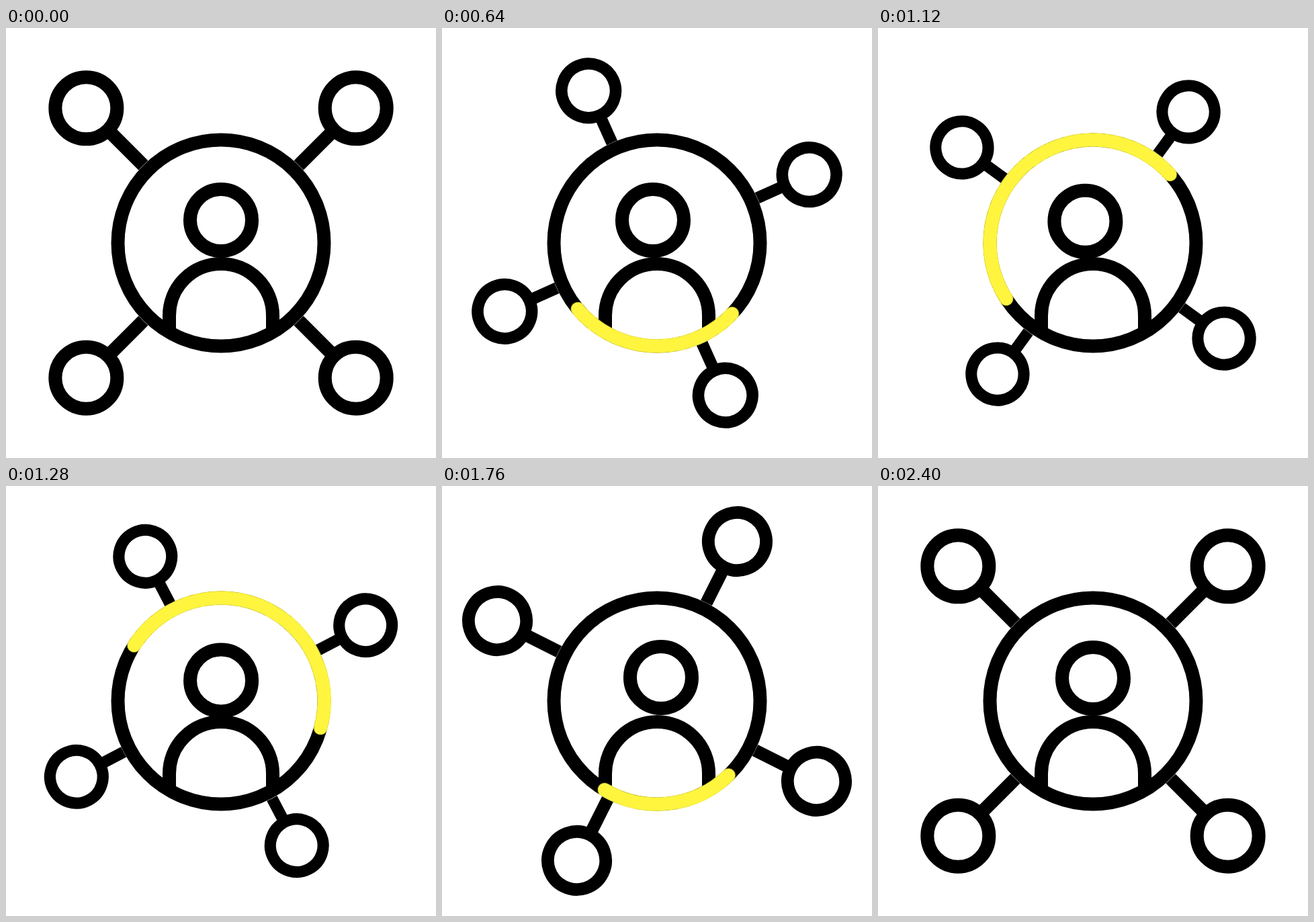
Recreate the animation shown at these times as an HTML page. Size 640 px wide and 640 px high, loop 2.48 s.

```html
<!DOCTYPE html>
<html lang="en">
<head>
<meta charset="utf-8">
<title>Network hub</title>
<style>
  html, body { margin: 0; width: 100%; height: 100%; overflow: hidden; background: #fff; }
  svg { display: block; width: 100%; height: 100%; }
  svg * { transform-origin: 0 0; }

  .line { fill: none; stroke: #000; stroke-width: 20; }
  .arc { fill: none; stroke: #fff53f; stroke-width: 20.6; stroke-linecap: round; }

  .nodes, .arc, .look, .nod { animation: 2480ms linear infinite; }
  .nodes { animation-name: spin, shrink; }
  .arc { animation-name: travel, stretch, show; }
  .look { animation-name: look; }
  .nod { animation-name: nod; }

  @keyframes spin {
    0% { rotate: 0deg; animation-timing-function: cubic-bezier(.535, 0, .437, 1); }
    96.774%, 100% { rotate: 180deg; }
  }
  @keyframes shrink {
    0% { scale: 1; animation-timing-function: cubic-bezier(.54, 0, .43, 1); }
    38.71% { scale: .85; }
    42.742% { scale: .85; animation-timing-function: cubic-bezier(.53, 0, .437, 1); }
    96.774%, 100% { scale: 1; }
  }

  /* tail angle of the highlight */
  @keyframes travel {
    0% { rotate: 20deg; animation-timing-function: cubic-bezier(.333, 0, .667, .376); }
    12.903% { rotate: 21.5deg; animation-timing-function: cubic-bezier(.333, .043, .667, .531); }
    25.806% { rotate: 43.2deg; animation-timing-function: cubic-bezier(.333, .199, .667, .535); }
    38.71% { rotate: 94.5deg; animation-timing-function: cubic-bezier(.333, .202, .667, .651); }
    51.613% { rotate: 212.2deg; animation-timing-function: cubic-bezier(.333, .318, .667, .761); }
    70.968% { rotate: 405.8deg; animation-timing-function: cubic-bezier(.333, .428, .667, 1); }
    96.774%, 100% { rotate: 550deg; }
  }
  /* length of the highlight in degrees */
  @keyframes stretch {
    0% { stroke-dasharray: 0 400; animation-timing-function: cubic-bezier(.333, 0, .667, .454); }
    12.903% { stroke-dasharray: 17.6 400; animation-timing-function: cubic-bezier(.333, .12, .667, .695); }
    25.806% { stroke-dasharray: 96.7 400; animation-timing-function: cubic-bezier(.333, .362, .667, .84); }
    38.71% { stroke-dasharray: 163.8 400; animation-timing-function: cubic-bezier(.333, .74, .667, 1); }
    45.161% { stroke-dasharray: 171 400; animation-timing-function: cubic-bezier(.333, 0, .667, .416); }
    51.613% { stroke-dasharray: 162.6 400; animation-timing-function: cubic-bezier(.333, .163, .667, .741); }
    70.968% { stroke-dasharray: 74.6 400; animation-timing-function: cubic-bezier(.333, .407, .667, 1); }
    96.774%, 100% { stroke-dasharray: 0 400; }
  }
  @keyframes show {
    0%, 3.22% { opacity: 0; }
    3.226%, 96.7% { opacity: 1; }
    96.75%, 100% { opacity: 0; }
  }

  @keyframes look {
    0%, 16.129% { translate: 0 0; animation-timing-function: cubic-bezier(.4, 0, .7, .55); }
    25.806% { translate: -6px 0; animation-timing-function: cubic-bezier(.333, .3, .667, 1); }
    37.903% { translate: -19px 0; animation-timing-function: cubic-bezier(.333, 0, .667, .6); }
    51.613% { translate: 0 0; animation-timing-function: cubic-bezier(.333, .4, .667, 1); }
    62.097% { translate: 18px 0; animation-timing-function: cubic-bezier(.333, 0, .667, .7); }
    70.968% { translate: 6px 0; animation-timing-function: cubic-bezier(.333, .5, .667, 1); }
    79.03%, 100% { translate: 0 0; }
  }
  @keyframes nod {
    0%, 38.71% { translate: 0 0; animation-timing-function: ease-in-out; }
    51.613% { translate: 0 3.4px; animation-timing-function: ease-in-out; }
    62.903% { translate: 0 0; }
    70.968% { translate: 0 -1px; animation-timing-function: ease-out; }
    79.03%, 100% { translate: 0 0; }
  }
</style>
</head>
<body>
<svg viewBox="0 0 640 640">
  <defs>
    <g id="node">
      <path d="M110 0H235"/>
      <circle cx="283.8" r="46"/>
    </g>
  </defs>
  <g transform="translate(320 320)">
    <g class="nodes line">
      <use href="#node" transform="rotate(45)"/>
      <use href="#node" transform="rotate(135)"/>
      <use href="#node" transform="rotate(225)"/>
      <use href="#node" transform="rotate(315)"/>
    </g>
    <circle r="163.8" fill="#fff"/>
    <g class="line">
      <circle r="153.5"/>
      <path d="M-77 130V108A77 77 0 0 1 77 108V130"/>
      <g class="look"><circle class="nod" cy="-34" r="46"/></g>
    </g>
    <circle class="arc" r="153.5" pathLength="360"/>
  </g>
</svg>
</body>
</html>
```
